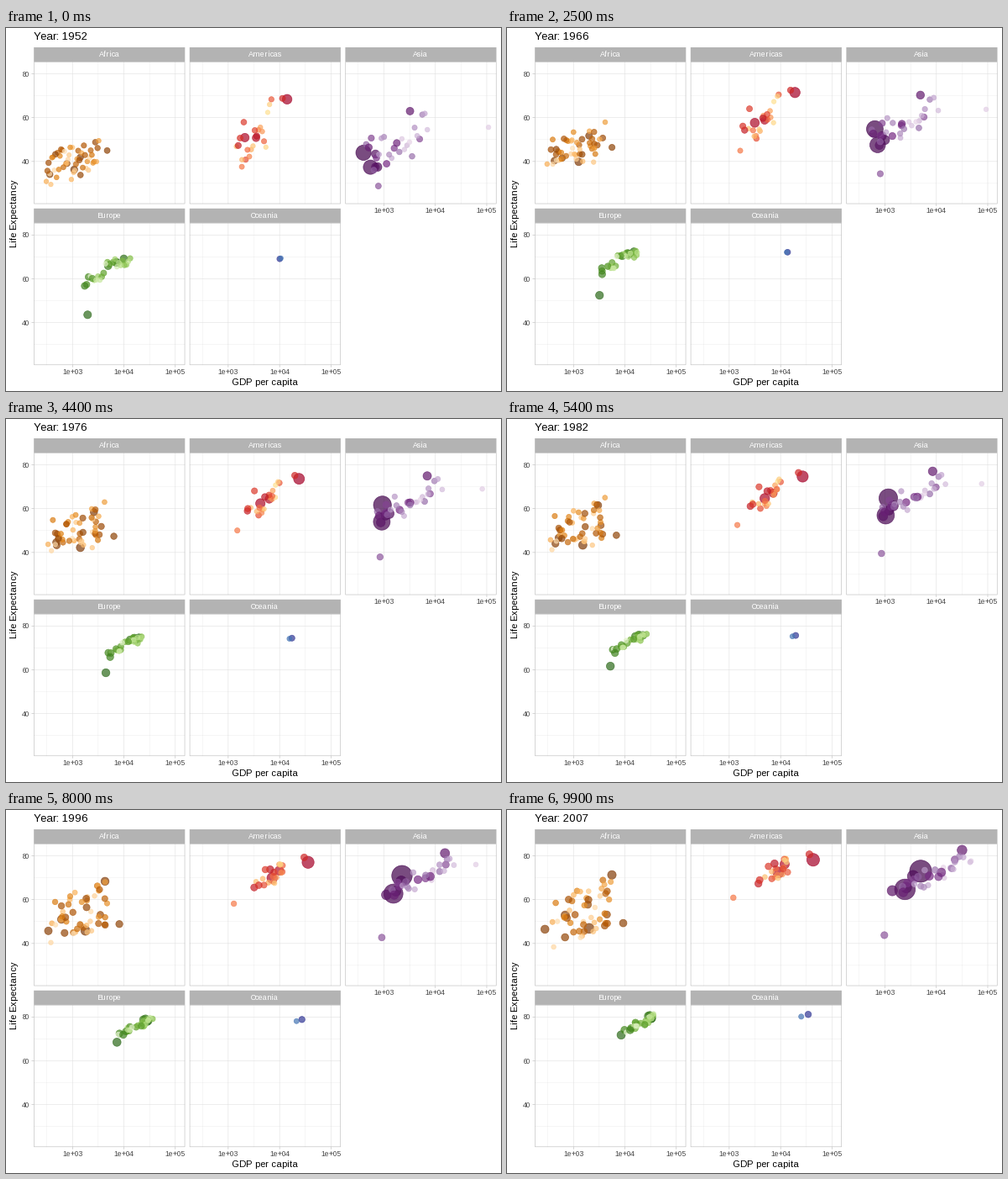
Recreate the animation shown at these times as a matplotlib script. Size 590 by 432 pixels, loop 10000 ms.

```python
import numpy as np
import matplotlib.pyplot as plt
from matplotlib.animation import FuncAnimation
from matplotlib.colors import to_rgb
from matplotlib.patches import Rectangle

plt.rcParams["font.family"] = "Liberation Sans"
plt.rcParams["text.hinting_factor"] = 1    # whole-pixel letter spacing

W, H, DPI = 590, 432, 64
PT = 72 / DPI                      # points per pixel
FRAMES, FIRST, LAST = 100, 1952, 2007
PANEL_W, PANEL_H, STRIP_H, GAP = 180.1, 169.2, 17.1, 5.5
X_MIN, X_SPAN = 2.248, 2.940       # log10 of GDP
Y_MAX, Y_SPAN = 85.553, 64.904     # years of life
GREY, GRID, DARK = "#b3b3b3", "#dedede", "#4d4d4d"

rng = np.random.default_rng(7)
fig = plt.figure(figsize=(W / DPI, H / DPI), dpi=DPI, facecolor="white")
ax = fig.add_axes([0, 0, 1, 1])
ax.set(xlim=(0, W), ylim=(H, 0))
ax.axis("off")


def line(xs, ys, color, width):
    ax.plot(xs, ys, color=color, lw=width * PT, zorder=1, snap=False,
            solid_capstyle="butt")


def box(x, y, w, h, **kw):
    ax.add_patch(Rectangle((x, y), w, h, zorder=4, snap=False, **kw))


def label(x, y, s, size, color="black", **kw):
    return ax.text(x, y, s, fontsize=size * PT, color=color, **kw)


def ease_out(u, power):
    return 1 - (1 - u) ** power


def ramp(colors, at):
    """Colours along an evenly spaced ramp, at in 0..1."""
    rgb = np.array([to_rgb("#" + c) for c in colors.split()])
    stops = np.linspace(0, 1, len(rgb))
    return np.array([np.interp(at, stops, channel) for channel in rgb.T]).T


def cloud_pose(z, mean, spread, life, slope, noise):
    """Log GDP and life of a cloud whose life rises with GDP."""
    gdp = mean + spread * z
    years = life + slope * spread * z + noise * rng.uniform(-1.7, 1.7, len(z))
    return gdp, np.clip(years, 29, 82)


class Panel:
    """Key bubbles are (GDP, life) at the start, the same at the end, and the
    final population in millions; a random cloud fills in the rest."""

    def __init__(self, name, col, row, colors, keys, growth, gdp_ease=1,
                 life_ease=1, cloud=None, x_axis=False):
        self.name, self.x_axis, self.y_axis = name, x_axis, col == 0
        self.left = 33.2 + col * (PANEL_W + GAP)
        self.top = 40.1 + row * (PANEL_H + STRIP_H + GAP)
        self.gdp_ease, self.life_ease, self.growth = gdp_ease, life_ease, growth

        g0, l0, g1, l1, pop = np.array(keys).T
        tracks = [np.log10(g0), l0, np.log10(g1), l1, pop, 0 * pop, 0 * pop]
        if cloud:
            tracks = [np.append(*t) for t in zip(tracks, self.scatter(**cloud))]
        (self.g0, self.l0, self.g1, self.l1, self.pop,
         self.sway, self.bend) = tracks

        rank = np.argsort(np.argsort(-self.pop))
        fill = ramp(colors, rank / (len(rank) - 1))
        self.draw_frame()
        self.dots = ax.scatter(self.g0, self.l0, c=fill, edgecolors=fill,
                               alpha=0.7, linewidths=0.71 * PT, zorder=3)

    @staticmethod
    def scatter(n, start, end, top, bend):
        z = rng.permutation(np.linspace(-1.7, 1.7, n))
        z_end = 0.8 * z + 0.3 * rng.uniform(-1.7, 1.7, n)
        pop = rng.permutation(top * np.exp(-3.6 * np.linspace(0, 1, n)))
        return (*cloud_pose(z, *start), *cloud_pose(z_end, *end), pop,
                rng.uniform(-0.08, 0.08, n), bend * rng.uniform(-0.3, 1, n))

    def x(self, log_gdp):
        return self.left + (log_gdp - X_MIN) / X_SPAN * PANEL_W

    def y(self, life):
        return self.top + (Y_MAX - life) / Y_SPAN * PANEL_H

    def draw_frame(self):
        l, t = self.left, self.top
        r, b = l + PANEL_W, t + PANEL_H
        for v in (2.5, 3.5, 4.5):
            line([self.x(v)] * 2, [t, b], GRID, 0.27)
        for v in (30, 50, 70):
            line([l, r], [self.y(v)] * 2, GRID, 0.27)
        for v in (3, 4, 5):
            x = self.x(v)
            line([x, x], [t, b], GRID, 0.53)
            if self.x_axis:
                line([x, x], [b, b + 2.75], GREY, 0.53)
                label(x, b + 11.1, f"1e+0{v}", 8.8, DARK, ha="center")
        for v in (40, 60, 80):
            y = self.y(v)
            line([l, r], [y, y], GRID, 0.53)
            if self.y_axis:
                line([l - 2.75, l], [y, y], GREY, 0.53)
                label(l - 4.95, y + 3.1, v, 8.8, DARK, ha="right")
        box(l + .27, t + .27, PANEL_W - .54, PANEL_H - .54, fill=False,
            ec=GREY, lw=0.53 * PT)
        box(l, t - STRIP_H, PANEL_W, STRIP_H, fc=GREY, lw=0)
        label((l + r) / 2, t - 6.2, self.name, 8.8, "white", ha="center",
              zorder=5)

    def update(self, u):
        gdp = self.g0 + (self.g1 - self.g0) * ease_out(u, self.gdp_ease)
        life = self.l0 + (self.l1 - self.l0) * ease_out(u, self.life_ease)
        gdp = gdp + self.sway * np.sin(2 * np.pi * u)
        life = life + self.bend * np.sin(np.pi * u)
        pop = self.pop * self.growth ** (u - 1)
        size = 2 + 10 * np.sqrt(pop / 1319)
        self.dots.set_offsets(np.column_stack([self.x(gdp), self.y(life)]))
        self.dots.set_sizes((0.75 * (size * 2.845 + 0.945) * PT) ** 2)


panels = [
    Panel("Africa", 0, 0, "7f3b08 b35806 e08214 fdb863 fee0b6",
          [(1077, 36.3, 2014, 46.9, 135), (1419, 41.9, 5581, 71.3, 80),
           (362, 34.1, 691, 52.9, 76), (781, 39.1, 278, 46.5, 65),
           (4725, 45.0, 9270, 49.3, 44)],
          growth=3.9, life_ease=1.4,
          cloud=dict(n=47, start=(3.0, .30, 39.5, 6, 4.5),
                     end=(3.23, .40, 55, 12, 7), top=42, bend=5)),
    Panel("Americas", 1, 0, "a50026 d73027 f46d43 fdae61 fee090",
          [(13990, 68.4, 42952, 78.2, 301), (2109, 50.9, 9066, 72.4, 190),
           (3478, 50.8, 11978, 76.2, 109), (11367, 68.8, 36319, 80.7, 33),
           (1840, 37.6, 1202, 60.9, 8.5)],
          growth=2.4, gdp_ease=1.1, life_ease=1.3,
          cloud=dict(n=20, start=(3.5, .20, 53, 20, 7),
                     end=(3.92, .22, 73.5, 7, 2.5), top=44, bend=1.5)),
    Panel("Asia", 2, 0, "40004b 762a83 9970ab c2a5cf e7d4e8",
          [(400, 44.0, 4959, 73.0, 1319), (547, 37.4, 2452, 64.7, 1110),
           (750, 37.5, 3541, 70.7, 224), (685, 43.4, 2606, 65.5, 169),
           (684, 37.5, 1391, 64.1, 150), (3217, 63.0, 31656, 82.6, 127),
           (779, 28.8, 975, 43.8, 32), (108382, 55.6, 47307, 77.6, 2.5)],
          growth=2.6, gdp_ease=0.7, life_ease=1.6, x_axis=True,
          cloud=dict(n=25, start=(3.25, .35, 47.5, 12, 6),
                     end=(3.95, .42, 71.5, 11, 2.5), top=91, bend=2)),
    Panel("Europe", 0, 1, "276419 4d9221 7fbc41 b8e186 e6f5d0",
          [(7144, 67.5, 32170, 79.4, 82), (1969, 43.6, 8458, 71.8, 71),
           (9980, 69.2, 33203, 79.4, 61), (7030, 67.4, 30470, 80.7, 61),
           (4931, 65.9, 28570, 80.5, 58)],
          growth=1.35, gdp_ease=1.4, life_ease=1.3, x_axis=True,
          cloud=dict(n=25, start=(3.68, .26, 64.5, 14, 2),
                     end=(4.32, .21, 77.4, 10, 1), top=40, bend=1)),
    Panel("Oceania", 1, 1, "313695 4575b4",
          [(10040, 69.1, 34435, 81.2, 20.4), (10557, 69.4, 25185, 80.2, 4.1)],
          growth=2.3, x_axis=True),
]

title = label(33.2, 14.5, "", 13.2)
label(308.8, 424.6, "GDP per capita", 11, ha="center")
label(13.4, 220.3, "Life Expectancy", 11, rotation=90, ha="center",
      va="baseline", rotation_mode="anchor")


def draw(i):
    u = i / (FRAMES - 1)
    title.set_text(f"Year: {round(FIRST + (LAST - FIRST) * u)}")
    for p in panels:
        p.update(u)
    return [title, *(p.dots for p in panels)]


anim = FuncAnimation(fig, draw, frames=FRAMES, interval=100, repeat=True,
                     repeat_delay=0)
plt.show()
```
